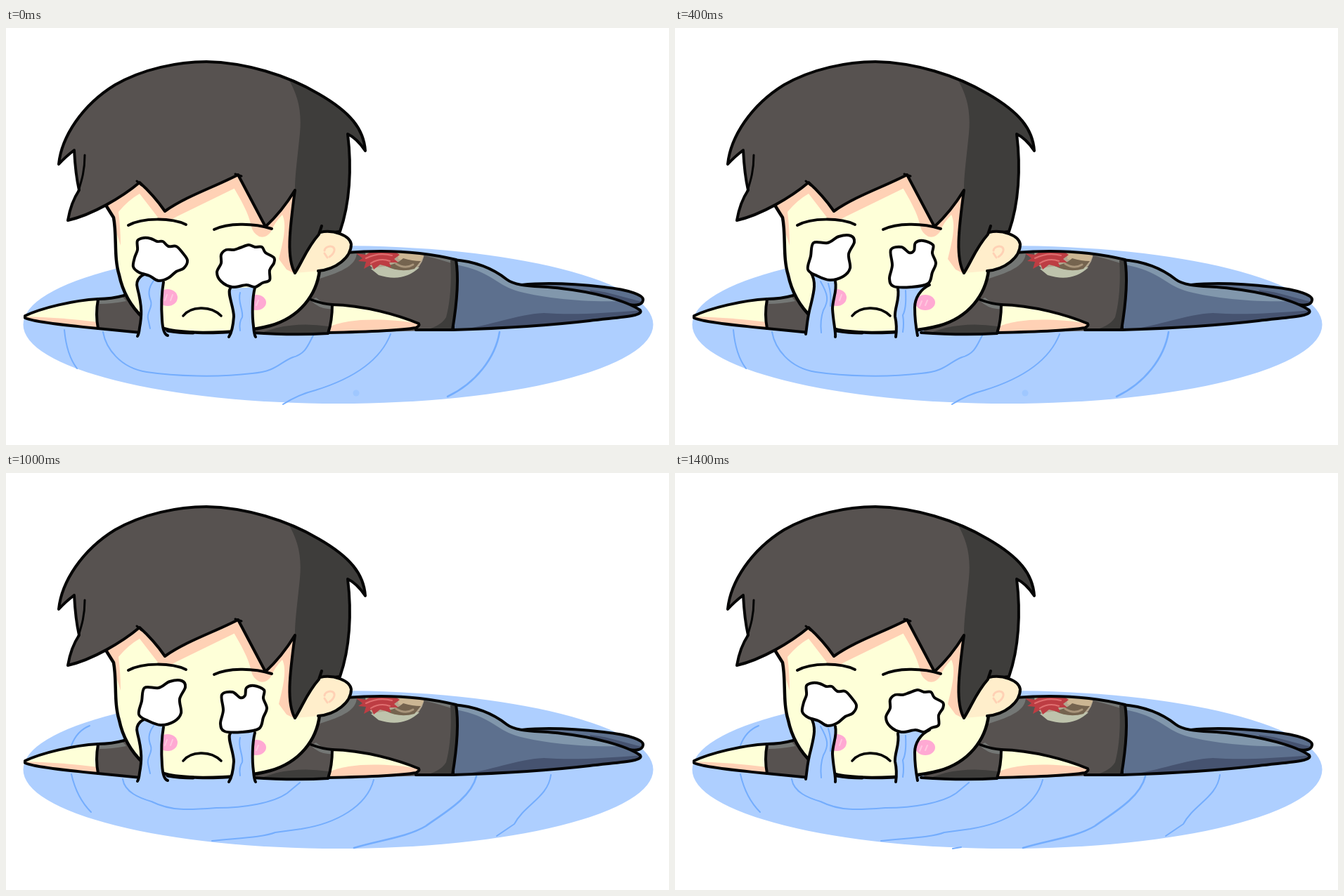
Write an HTML page with a canvas that moves like this. It is 943 px wide and 594 px high and loops after 1.6 s.

```html
<!DOCTYPE html>
<html lang="en">
<head>
<meta charset="utf-8">
<title>Puddle of tears</title>
<style>
html, body { margin: 0; width: 100%; height: 100%; overflow: hidden; background: #fff; }
canvas { display: block; width: 943px; height: 594px; }
</style>
</head>
<body>
<canvas id="stage" width="943" height="594"></canvas>
<script>
const ctx = document.getElementById('stage').getContext('2d');
const INK = '#050505', SKIN = '#feffd8', PEACH = '#ffd1b5', CLOTH = '#575250',
      DARK = '#3e3d3b', GLOSS = '#747775', WATER = '#aecfff', RIPPLE = '#74adfd',
      DENIM = '#5d708e', DENIM_DARK = '#465370', DENIM_LIGHT = '#8197ac';

ctx.lineCap = ctx.lineJoin = 'round';

function fill(d, color) {
  ctx.fillStyle = color;
  ctx.fill(new Path2D(d));
}

function line(d, width = 4, color = INK) {
  ctx.strokeStyle = color;
  ctx.lineWidth = width;
  ctx.stroke(new Path2D(d));
}

function shape(d, color, width) {
  fill(d, color);
  line(d, width);
}

function oval(x, y, rx, ry, color) {
  ctx.fillStyle = color;
  ctx.beginPath();
  ctx.ellipse(x, y, rx, ry, 0, 0, Math.PI * 2);
  ctx.fill();
}

function clipped(d, draw) {
  ctx.save();
  ctx.clip(new Path2D(d));
  draw();
  ctx.restore();
}

// Closed smooth curve through the given points.
function blob(p) {
  const n = p.length, at = i => p[(i + n) % n];
  let d = 'M' + p[0];
  for (let i = 0; i < n; i++) {
    const [a, b, c, e] = [at(i - 1), at(i), at(i + 1), at(i + 2)];
    d += 'C' + [b[0] + (c[0] - a[0]) / 6, b[1] + (c[1] - a[1]) / 6,
                c[0] - (e[0] - b[0]) / 6, c[1] - (e[1] - b[1]) / 6, ...c];
  }
  return d + 'Z';
}

const eyes = {
  wide: [
    blob([[187,303],[196,299],[206,300],[215,304],[223,304],[231,311],[242,311],[251,320],
          [258,331],[253,342],[242,347],[231,356],[217,360],[204,353],[189,348],[181,340],
          [183,327],[187,316]]),
    blob([[306,323],[313,316],[324,316],[333,313],[345,309],[354,312],[364,312],[369,320],
          [381,327],[381,335],[375,345],[375,359],[365,363],[354,369],[342,366],[322,369],
          [306,361],[300,348],[306,335]])
  ],
  tall: [
    blob([[197,306],[217,306],[233,297],[250,296],[255,305],[247,322],[249,342],[239,354],
          [220,359],[202,353],[189,344],[193,325]]),
    blob([[307,316],[322,312],[333,320],[340,317],[342,306],[353,303],[367,309],[366,321],
          [371,335],[366,348],[360,364],[336,369],[311,368],[305,357],[309,338]])
  ]
};

const tears = {
  outer: {
    sides: [
      ['M210 350C194 347 183 358 187 371C194 398 193 411 190 427Q189 436 187 439',
       'M224 362C220 385 221 402 222 416C223 432 226 437 230 438'],
      ['M319 371C314 377 324 397 324 411C323 425 321 434 317 440',
       'M354 370C350 385 350 410 352 425Q353 437 355 440']
    ],
    fills: [
      'M210 350C194 347 183 358 187 371C194 398 193 411 190 427L189 439H228C221 427 220 385 224 360Z',
      'M318 371C314 377 324 397 324 411C323 425 321 434 318 440H354C349 420 349 385 354 369Z'
    ],
    streaks: 'M210 360C201 372 203 381 206 389C209 398 200 405 202 414L205 428M333 377C329 390 338 402 336 412Q331 419 333 431'
  },
  inner: {
    sides: [
      ['M193 348C202 362 197 378 193 395C188 413 188 423 186 436',
       'M228 361C231 375 224 386 224 400C225 419 229 433 228 440'],
      ['M317 371C320 386 312 399 313 411C316 424 315 433 314 440',
       'M362 366C349 372 341 385 341 398C341 415 343 428 345 438']
    ],
    fills: [
      'M193 348C202 362 197 378 193 395C188 413 188 423 187 438H228C226 425 224 418 224 400C224 386 231 375 228 358Z',
      'M317 369C320 386 312 399 313 411C316 424 315 433 315 439H344C342 425 341 415 341 398C341 385 349 372 361 366Z'
    ],
    streaks: 'M207 361C218 380 219 388 211 402Q206 416 208 434M218 364Q223 380 221 396M328 374C329 392 328 402 324 409Q326 421 324 433'
  }
};

const ripples = {
  far: [
    'M83 430C85 452 91 472 101 485',
    'M138 433C142 456 162 484 200 490C240 496 300 498 350 492C385 489 388 477 408 469C427 464 430 450 437 438',
    'M547 436C530 480 482 503 440 516Q416 522 394 536',
    'M702 433C696 470 668 506 628 525'
  ],
  near: [
    'M93 429C98 451 108 470 121 483',
    'M166 436C169 455 190 463 207 468C235 482 260 480 300 477C340 477 380 470 400 456L418 441',
    'M523 437C513 475 470 499 420 507L383 512C365 519 330 520 293 524',
    'M669 432C661 464 620 486 597 503C570 519 530 523 495 534',
    'M775 430C771 462 738 472 723 500L698 517',
    'M93 388Q101 367 119 360'
  ]
};

function puddle(kind, tail) {
  oval(472.5, 422.5, 448, 112.5, WATER);
  ripples[kind].forEach((d, i) => line(d, i === 3 ? 2.6 : 2, RIPPLE));
  if (kind === 'far') oval(498, 520, 4.5, 4.5, '#9fc7ff');
  if (tail) line('M395 535L407 533', 2, RIPPLE);
}

function legs() {
  const back = 'M733 366C772 362 815 365 850 369C888 373 908 381 906 388C905 394 897 396 886 394L790 376Z';
  fill(back, DENIM);
  clipped(back, () => fill('M830 373C862 376 886 387 908 390V400H850Z', DENIM_DARK));
  line(back);
  const front = 'M636 330C675 333 697 346 712 358C726 369 755 367 790 371C835 376 882 388 902 402C908 411 870 412 830 417C770 424 700 428 636 430Z';
  fill(front, DENIM);
  clipped(front, () => {
    fill('M640 330C676 332 696 345 711 357C730 368 770 367 810 373Q845 379 874 389C820 391 760 384 725 374C695 364 690 347 640 337Z', DENIM_LIGHT);
    fill('M644 430C690 424 725 408 765 406C810 409 850 406 905 402V420L640 434Z', DENIM_DARK);
  });
  line(front);
}

function print() {
  clipped('M490 319C545 316 595 319 640 331V432H490Z', () => {
    oval(553, 319, 42, 36, '#b3a690');
    fill('M558 310H596Q595 335 580 340Q570 332 558 329Z', '#ccb693');
    fill('M519 343Q545 336 588 341Q565 363 530 352Z', '#bec3ac');
    fill('M540 339Q557 336 565 328Q578 332 590 332L581 343Q560 349 540 339Z', '#75644f');
    line('M555 336Q568 344 579 337', 3, '#a9957b');
    fill('M498 321L512 323L520 318H552L560 323L552 329L558 334L545 334L548 341L532 337L523 344L520 337L509 343L512 333L501 332L507 328Z', '#bd3d43');
    line('M512 328Q530 319 549 324M519 335Q532 327 546 332', 2, '#e06f70');
  });
}

function torso() {
  const d = 'M440 350C455 342 478 330 490 319C545 315 595 319 640 330C645 360 640 400 635 430L460 435L430 400Z';
  fill(d, CLOTH);
  clipped(d, () => {
    fill('M443 347L490 319L499 320C498 337 482 346 443 358Z', GLOSS);
    fill('M594 319Q622 322 640 331V337Q615 329 594 324Z', GLOSS);
    fill('M632 331H645V432H590Q618 426 626 412C632 390 634 360 632 331Z', DARK);
  });
  print();
  line('M484 320C545 315 595 319 640 330C645 360 640 400 635 430L583 430');
}

function arms() {
  const left = 'M27 410C50 399 95 388 131 386V428C90 424 40 419 27 413Z';
  fill(left, SKIN);
  clipped(left, () => fill('M27 411Q75 412 131 419V430H27Z', PEACH));
  line(left);
  fill('M131 386Q150 386 168 380L192 407L192 434L131 428Q127 408 131 386Z', CLOTH);
  fill('M133 387Q150 387 166 383L171 389Q150 393 133 393Z', GLOSS);
  line('M168 381Q150 386 131 386Q127 408 131 428L192 434');

  const right = 'M463 394C510 395 558 409 587 421Q589 424 583 427C560 431 505 433 458 434Z';
  fill(right, SKIN);
  clipped(right, () => fill('M459 426C488 413 535 413 590 421V436H457Z', PEACH));
  line(right);
  fill('M350 434L440 380Q450 392 464 394Q464 417 458 435Q410 438 350 434Z', CLOTH);
  fill('M433 388L441 384Q451 393 463 395V400Q448 402 433 388Z', GLOSS);
  fill('M385 427Q420 419 459 425L457 435H360Z', DARK);
  line('M434 387Q450 393 464 394Q464 417 458 435Q410 438 350 434');
}

function face() {
  const d = 'M143 254L153 270C158 297 153 326 161 352C166 376 177 396 195 413C215 431 245 433 280 434C315 434 350 431 376 424C418 412 442 380 446 345L470 250L330 195L190 205Z';
  fill(d, SKIN);
  clipped(d, () => {
    fill('M140 252L190 215L226 255L330 205L342 226L328 227L240 270Q227 279 217 271L190 236Q174 245 160 262Q163 285 163 310L152 275Z', PEACH);
    fill('M328 207L369 281L411 229L404 300L411 350L399 344L388 329C394 305 400 280 393 266Q382 277 377 290Q370 300 360 297Q351 292 349 283C345 263 334 245 322 224Z', PEACH);
  });
  line('M143 254L153 270C158 297 153 326 161 352C166 376 177 396 195 413C215 431 245 433 280 434C315 434 350 431 376 424C418 412 442 380 446 345', 4.5);
  line('M230 431Q246 434 266 434', 5);
  oval(230, 384, 14, 12, '#ffa9d3');
  oval(356, 391, 14, 11, '#ffa9d3');
  line('M229 380L226 388M237 380L234 388M351 389L348 396M359 388L356 395', 2, '#ffc8df');
  line('M174 281C194 270 235 270 256 280M296 287C315 278 350 277 378 286', 4);
  line('M252 410C262 397 290 394 306 410', 3.6);
}

function hair() {
  const d = 'M88 274C91 256 96 243 104 231C100 214 98 193 97 174Q84 184 75 194C79 155 108 110 155 81C195 58 245 48 285 48C340 49 400 67 445 94C490 120 509 144 511 175Q499 157 486 151C492 200 489 250 475 290L447 293C428 313 421 334 411 349C399 328 403 290 411 231Q392 262 369 283L330 209C298 226 257 239 226 261Q211 239 190 220C165 241 123 266 88 274Z';
  fill(d, CLOTH);
  clipped(d, () => fill('M399 68C415 94 421 117 418 150C414 190 411 210 411 231L400 355H520V60Z', DARK));
  line(d);
  line('M112 181C112 203 108 216 103 232', 3);
  line('M186 218L193 224M326 208L335 211', 3);
}

function ear() {
  fill('M447 291C465 287 489 295 491 308C491 327 469 344 444 346L412 349C421 334 428 313 447 291Z', '#ffeecb');
  line('M447 291C465 287 489 295 491 308C491 327 469 344 444 346');
  line('M449 282L445 294C428 313 421 334 411 349');
  line('M453 317C454 310 468 308 467 317Q466 322 460 326M453 321L457 327', 3, PEACH);
}

function weep(kind) {
  const t = tears[kind];
  t.fills.forEach(d => fill(d, WATER));
  line(t.streaks, 2, RIPPLE);
  t.sides.flat().forEach(d => line(d, 4));
}

const poses = [
  { eye: 'wide', tear: 'outer', ripple: 'far' },
  { eye: 'tall', tear: 'outer', ripple: 'near' },
  { eye: 'tall', tear: 'inner', ripple: 'far' },
  { eye: 'wide', tear: 'inner', ripple: 'near', tail: true }
];

function draw(pose) {
  ctx.fillStyle = '#fff';
  ctx.fillRect(0, 0, 943, 594);
  puddle(pose.ripple, pose.tail);
  legs();
  torso();
  arms();
  face();
  hair();
  ear();
  weep(pose.tear);
  eyes[pose.eye].forEach(d => shape(d, '#fff', 4));
}

let start;
function tick(now) {
  start ??= now;
  draw(poses[Math.floor((now - start) / 200) % poses.length]);
  requestAnimationFrame(tick);
}
draw(poses[0]);
requestAnimationFrame(tick);
</script>
</body>
</html>
```
